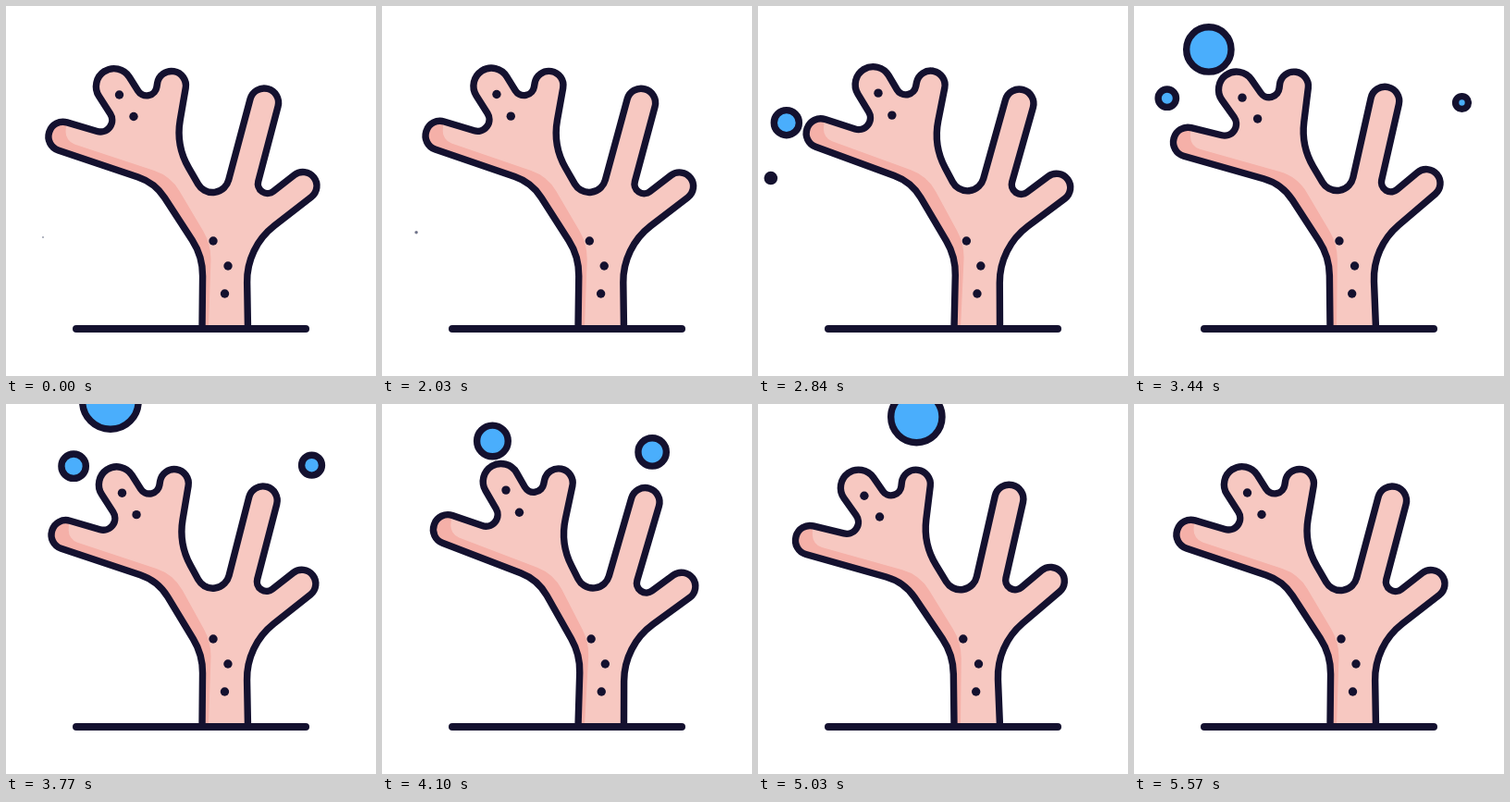
An HTML page with a canvas that plays this animation: 400x400 px, repeating every 5780 ms.

```html
<!DOCTYPE html>
<html>
<head>
<meta charset="utf-8">
<style>
  html, body { margin: 0; width: 100%; height: 100%; overflow: hidden; background: #fff; }
  canvas { display: block; width: 100%; height: 100%; }
</style>
</head>
<body>
<canvas width="400" height="400"></canvas>
<script>
const LOOP = 5780, START = 2000, END = 5570, STEP = 30;
const INK = '#14112f', SKIN = '#f7c8c1', SHADE = '#f5b0a8', WATER = '#4aaefc';
const LINE = 7.4;

const ctx = document.querySelector('canvas').getContext('2d');
ctx.lineCap = ctx.lineJoin = 'round';

// Two corners that close a finger with a half circle
function finger(x, y, degrees, r) {
  const a = degrees * Math.PI / 180, c = r * Math.cos(a), s = r * Math.sin(a);
  return [[x + c + s, y + s - c, r], [x + c - s, y + s + c, r]];
}

// Corners are x, y, rounding radius
const BODY = [
  [212, 349, 0], [212.8, 271, 70], [161, 191, 55],
  ...finger(61.5, 141, 197.5, 15.5), [131, 145, 12.6],
  ...finger(117, 87, 237, 19.5), [158, 116, 11],
  ...finger(179, 86, 279.5, 15.5), [183.5, 151, 77], [229.5, 230, 18],
  ...finger(279, 104.5, 285, 15.5), [265, 219, 10.3],
  ...finger(321, 194.5, 322, 15), [260, 261, 76], [261.5, 349, 0]
];
const SHADOW = [
  [219, 349, 0], [222, 258, 60], [178, 184, 50], [64, 146, 14], [66, 110, 0], [0, 110, 0], [0, 349, 0]
];
const DOTS = [[122.5, 96], [138, 119.5], [224, 254], [240, 281], [236.5, 311]];

// Each bubble grows while it drifts along one Bezier curve
const BUBBLES = [
  { start: 2000, end: 3940, size: 33, xs: [40, -25, 74, 128], ys: [250, 135, 84, -32] },
  { start: 2470, end: 4900, size: 25.5, xs: [45, -70, 146, 226], ys: [266, 63, 58, -30] },
  { start: 2850, end: 5300, size: 31, xs: [338, 429, 196, 150], ys: [279, -87, 144, -30] }
];

const smooth = (a, b, v) => {
  const u = Math.min(1, Math.max(0, (v - a) / (b - a)));
  return u * u * (3 - 2 * u);
};
const mix = (a, b, w) => a + (b - a) * w;
const bezier = ([a, b, c, d], u) => {
  const v = 1 - u;
  return v * v * v * a + 3 * u * v * v * b + 3 * u * u * v * c + u * u * u * d;
};

// Two fading swings, with the branches leaning apart meanwhile
function swayAt(t) {
  const p = (t - START) / (END - START), wave = n => Math.sin(n * Math.PI * p);
  return { swing: wave(4) * (1 - p ** 6) + .27 * wave(2), lean: wave(1) };
}

// Left and right branches turn separately above a bending trunk
function bend([x, y, r], { swing, lean }) {
  const side = smooth(190, 258, x), up = smooth(270, 195, y), rise = Math.max(0, 215 - y);
  const left = swing * (4.2 + .06 * rise) + 3.5 * lean;
  const right = swing * (4.5 + .04 * rise) - lean;
  const dy = swing * mix(.06 * Math.min(0, x - 190), .04 * Math.max(0, x - 225), side);
  const trunk = swing * 2.6 * (348 - y) / 94;
  return [x + mix(trunk, mix(left, right, side), up), y + dy * up, r];
}

function rounded(corners, sway) {
  const path = new Path2D(), pts = corners.map(c => bend(c, sway));
  path.moveTo(pts[0][0], pts[0][1]);
  for (let i = 1; i < pts.length - 1; i++) {
    const [x, y, r] = pts[i];
    path.arcTo(x, y, pts[i + 1][0], pts[i + 1][1], r);
  }
  const [x, y] = pts[pts.length - 1];
  path.lineTo(x, y);
  return path;
}

function disc(x, y, r, fill, stroke) {
  ctx.beginPath();
  ctx.arc(x, y, r, 0, 2 * Math.PI);
  ctx.fillStyle = fill;
  ctx.fill();
  if (!stroke) return;
  ctx.lineWidth = stroke;
  ctx.stroke();
}

function drawCoral(sway) {
  const body = rounded(BODY, sway);
  ctx.fillStyle = SKIN;
  ctx.fill(body);
  ctx.save();
  ctx.clip(body);
  ctx.fillStyle = SHADE;
  ctx.fill(rounded(SHADOW, sway));
  ctx.restore();
  ctx.lineWidth = LINE;
  ctx.stroke(body);
  for (const dot of DOTS) {
    const [x, y] = bend(dot, sway);
    disc(x, y, 4.7, INK);
  }
}

function drawBubble({ start, end, size, xs, ys }, t) {
  const u = (t - start) / (end - start);
  if (u < 0 || u > 1) return;
  ctx.globalAlpha = Math.min(1, .4 + (t - start) / 200);
  const stroke = Math.min(LINE, 1.2 + (t - start) * .03);
  disc(bezier(xs, u), bezier(ys, u), .4 + size * u ** 1.1, WATER, stroke);
  ctx.globalAlpha = 1;
}

function draw(t) {
  ctx.clearRect(0, 0, 400, 400);
  ctx.strokeStyle = INK;
  drawCoral(swayAt(t));
  ctx.lineWidth = 8;
  ctx.beginPath();
  ctx.moveTo(76, 349);
  ctx.lineTo(324, 349);
  ctx.stroke();
  BUBBLES.forEach(b => drawBubble(b, t));
}

const origin = performance.now();
function tick() {
  const t = Math.max(0, performance.now() - origin) % LOOP;
  const stepped = START + STEP * Math.floor((t - START) / STEP);
  draw(Math.min(END, Math.max(START, stepped)));
  requestAnimationFrame(tick);
}
tick();
</script>
</body>
</html>
```
